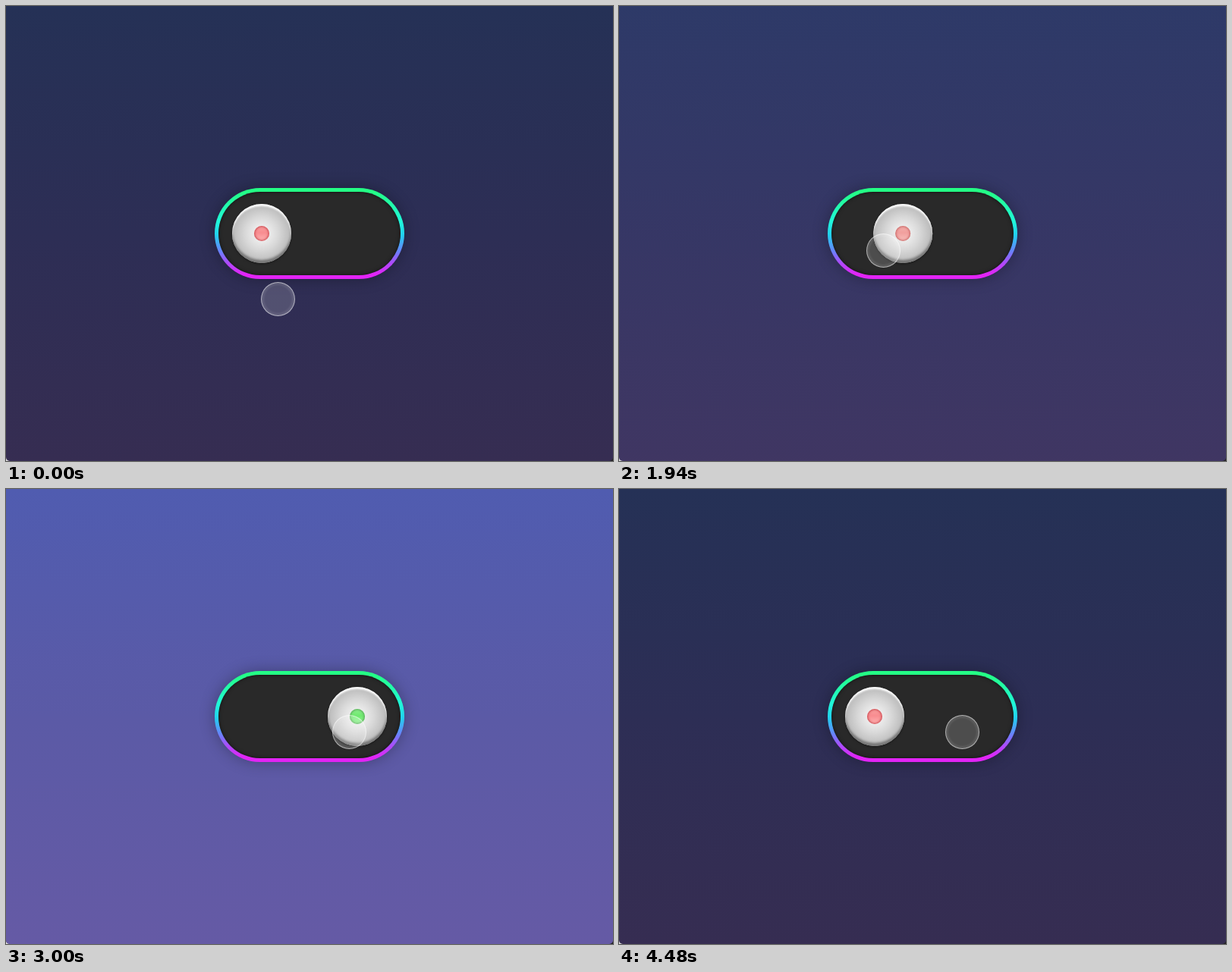
Recreate the animation shown at these times as an HTML page. Size 800 by 600 pixels, loop 4.5 s.

```html
<!DOCTYPE html>
<html lang="en">
<head>
<meta charset="utf-8">
<title>Toggle switch</title>
<style>
  html, body { margin: 0; width: 100%; height: 100%; overflow: hidden; }
  body { position: relative; background: linear-gradient(90deg, #ddd 50%, #222 50%); }
  div { position: absolute; box-sizing: border-box; }
  .stage { width: 800px; height: 600px; overflow: hidden; border-radius: 0 0 5px 5px; }
  .bg { inset: 0; }
  .dark { background: linear-gradient(#253156, #2d2e55 50%, #362d52); }
  .lit { background: linear-gradient(#505cb0, #5b5aa6 50%, #655aa5); }
  .pill {
    left: 275px; top: 240px; width: 250px; height: 120px; border-radius: 60px;
    background: linear-gradient(#24ff85 4%, #20f8d8 36%, #22d0f0 52%, #6b80fb 70%, #b048fb 83%, #e224f6 95%);
    box-shadow: 0 0 20px rgba(0, 0, 0, .3);
  }
  .track {
    inset: 5px; border-radius: 55px; background: #292929;
    box-shadow: inset 0 0 5px rgba(0, 0, 0, .6);
  }
  .knob {
    left: 298px; top: 261px; width: 78px; height: 78px; border-radius: 50%;
    background: radial-gradient(circle, #f2f2f2 10%, #d8d8d8 40%, #b9b9b9 70%);
    box-shadow: inset 0 3px 2px #f8f8f8, inset 0 -4px 3px #777, 0 1px 3px rgba(0, 0, 0, .5);
  }
  .lamp { left: 29px; top: 29px; width: 20px; height: 20px; border-radius: 50%; }
  .green {
    background: linear-gradient(#8ff08f, #6fe96f 45%, #98f698);
    box-shadow: inset 0 0 3px 1px #58a558;
  }
  .red {
    background: linear-gradient(#f8a0a0, #f88c90 45%, #ffb4b4);
    box-shadow: inset 0 0 3px 1px #c8484e;
  }
  .cursor {
    left: -22.5px; top: -22.5px; width: 45px; height: 45px; border-radius: 50%;
    border: 1px solid rgba(255, 255, 255, .5);
    background: radial-gradient(circle, rgba(255, 255, 255, .17) 55%, rgba(255, 255, 255, .27) 71%);
  }
</style>
</head>
<body>
<div class="stage">
  <div class="bg dark"></div>
  <div class="bg lit"></div>
  <div class="pill"><div class="track"></div></div>
  <div class="knob">
    <div class="lamp green"></div>
    <div class="lamp red"></div>
  </div>
  <div class="cursor"></div>
</div>
<script>
const LOOP = 4500, ON = 1880, OFF = 3330, SWITCH = 300, TRAVEL = 126;
const [lit, knob, green, red, cursor] =
  ['.lit', '.knob', '.green', '.red', '.cursor'].map(s => document.querySelector(s));

const ramp = (t, start, length) => Math.min(1, Math.max(0, (t - start) / length));
const smooth = u => u * u * (3 - 2 * u);
const mix = (a, b, u) => a + (b - a) * u;

// The CSS "ease" curve, cubic-bezier(.25, .1, .25, 1)
const bezier = (a, b, s) => 3 * (1 - s) * s * ((1 - s) * a + s * b) + s * s * s;
function ease(u) {
  let lo = 0, hi = 1;
  for (let i = 0; i < 24; i++) {
    const mid = (lo + hi) / 2;
    if (bezier(.25, .25, mid) < u) lo = mid; else hi = mid;
  }
  return bezier(.1, 1, lo);
}

function draw(t) {
  const on = ramp(t, ON, SWITCH), off = ramp(t, OFF, SWITCH);
  const glow = on - off;
  knob.style.transform = `translateX(${TRAVEL * (ease(on) - ease(off))}px)`;
  lit.style.opacity = green.style.opacity = glow;
  red.style.opacity = 1 - glow;

  const rise = smooth(ramp(t, 1220, 500)), cross = smooth(ramp(t, 2400, 520));
  const x = mix(mix(358, 348, rise), 452, cross);
  const y = mix(mix(386, 322, rise), 320, cross);
  cursor.style.transform = `translate(${x}px, ${y}px)`;
}

let begin;
function tick(now) {
  begin ??= now;
  draw((now - begin) % LOOP);
  requestAnimationFrame(tick);
}
draw(0);
requestAnimationFrame(tick);
</script>
</body>
</html>
```
